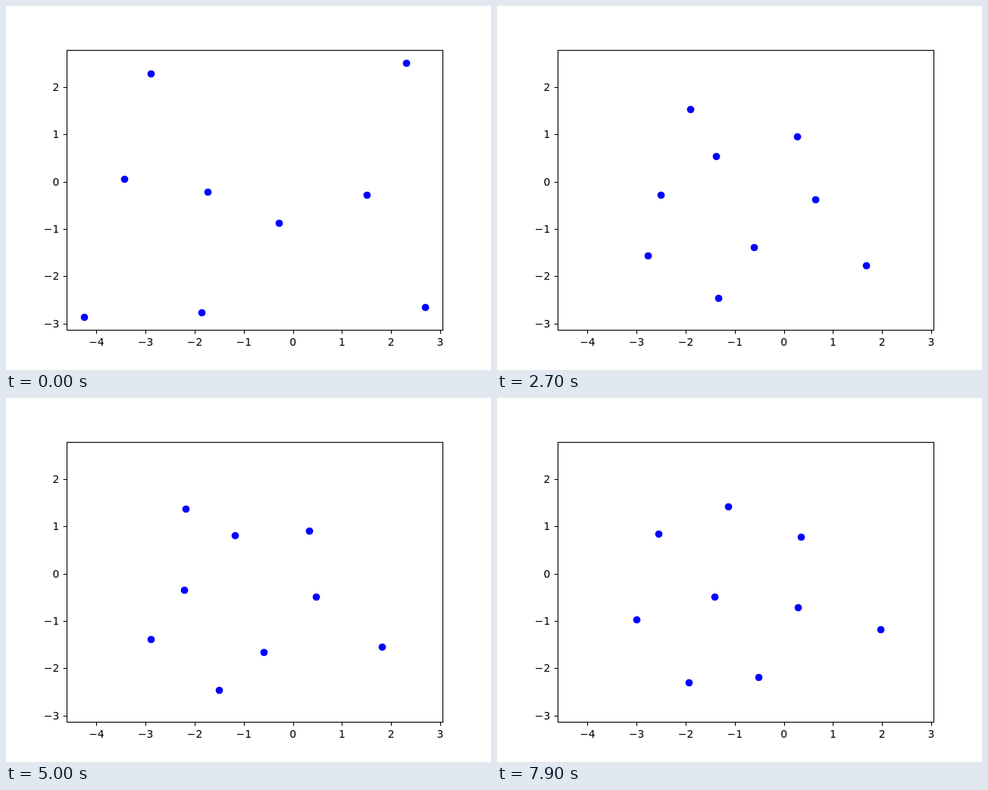
Animation of 640x480 px, one loop 8 s. Source, as an HTML page:

```html
<!DOCTYPE html>
<html lang="en">
<head>
<meta charset="utf-8">
<title>Points settling</title>
<style>
  html, body { margin: 0; width: 100%; height: 100%; overflow: hidden; background: #fff; }
  svg { display: block; width: 640px; height: 480px; }
  text { font: 13.89px "DejaVu Sans", sans-serif; fill: #000; }
  .axis { fill: none; stroke: #000; stroke-width: 1.11; }
  .dot { fill: #00f; }
</style>
</head>
<body>
<svg viewBox="0 0 640 480"></svg>
<script>
const LOOP = 8000, STEP = 100;
const DECAY = 3.5; // rate of the quick collapse, per second

// Each dot: its start, then where it passes at the KNOTS (seconds).
const KNOTS = [1.3, 2.7, 4.2, 5.8, 6.7, 7.9];
const DOTS = [
  { start: [191, 89],  x: [254, 255, 246, 228, 219, 213], y: [137, 136, 140, 154, 166, 179] },
  { start: [528, 75],  x: [400, 396, 398, 402, 402, 401], y: [167, 172, 174, 177, 181, 183] },
  { start: [156, 228], x: [210, 216, 226, 247, 265, 287], y: [244, 249, 251, 256, 259, 262] },
  { start: [266, 245], x: [285, 289, 296, 307, 308, 305], y: [213, 198, 190, 170, 154, 143] },
  { start: [360, 286], x: [344, 339, 339, 342, 344, 345], y: [302, 318, 328, 342, 353, 368] },
  { start: [476, 249], x: [423, 420, 413, 405, 400, 397], y: [254, 255, 259, 266, 270, 276] },
  { start: [103, 410], x: [199, 199, 194, 187, 184, 184], y: [335, 329, 323, 312, 303, 292] },
  { start: [258, 404], x: [293, 292, 286, 275, 266, 253], y: [379, 385, 386, 384, 381, 375] },
  { start: [553, 397], x: [484, 487, 493, 499, 502, 506], y: [351, 342, 333, 322, 315, 305] }
];

const svg = document.querySelector("svg");

function add(tag, attrs, text = "") {
  const el = document.createElementNS("http://www.w3.org/2000/svg", tag);
  for (const key in attrs) el.setAttribute(key, attrs[key]);
  el.textContent = text;
  svg.appendChild(el);
  return el;
}

const label = n => String(n).replace("-", "\u2212");

function drawAxes() {
  add("rect", { class: "axis", x: 80.5, y: 58.5, width: 496, height: 369 });
  for (let n = -4; n <= 3; n++) {
    const x = 378.6 + 64.8 * n;
    add("path", { class: "axis", d: `M${Math.round(x) + 0.5} 427.5v4.86` });
    add("text", { x, y: 448, "text-anchor": "middle" }, label(n));
  }
  for (let n = -3; n <= 2; n++) {
    const y = Math.round(231.7 - 62.3 * n);
    add("path", { class: "axis", d: `M80.5 ${y + 0.5}h-4.86` });
    add("text", { x: 70.3, y: y + 5, "text-anchor": "end" }, label(n));
  }
}

function slope(v, i) {
  const a = Math.max(i - 1, 0), b = Math.min(i + 1, v.length - 1);
  return (v[b] - v[a]) / (KNOTS[b] - KNOTS[a]);
}

// Slow drift: cubic Hermite through the knots, straight before the first.
function drift(v, t) {
  if (t <= KNOTS[0]) return v[0] + slope(v, 0) * (t - KNOTS[0]);
  let i = 0;
  while (i < KNOTS.length - 2 && t > KNOTS[i + 1]) i++;
  const h = KNOTS[i + 1] - KNOTS[i];
  const u = (t - KNOTS[i]) / h, w = 1 - u;
  return w * w * (1 + 2 * u) * v[i] + u * u * (3 - 2 * u) * v[i + 1]
    + h * u * w * (w * slope(v, i) - u * slope(v, i + 1));
}

function collapse(t) {
  const end = Math.exp(-DECAY * KNOTS[0]);
  return Math.max(0, (Math.exp(-DECAY * t) - end) / (1 - end));
}

const place = (start, v, t) =>
  Math.round(drift(v, t) + (start - drift(v, 0)) * collapse(t)) + 0.5;

drawAxes();
const circles = DOTS.map(() => add("circle", { class: "dot", r: 4.86 }));

function draw(ms) {
  const t = Math.floor((ms % LOOP) / STEP) * STEP / 1000;
  DOTS.forEach((dot, i) => {
    circles[i].setAttribute("cx", place(dot.start[0], dot.x, t));
    circles[i].setAttribute("cy", place(dot.start[1], dot.y, t));
  });
}

const begin = performance.now();
function tick() {
  draw(performance.now() - begin);
  requestAnimationFrame(tick);
}
tick();
</script>
</body>
</html>
```
